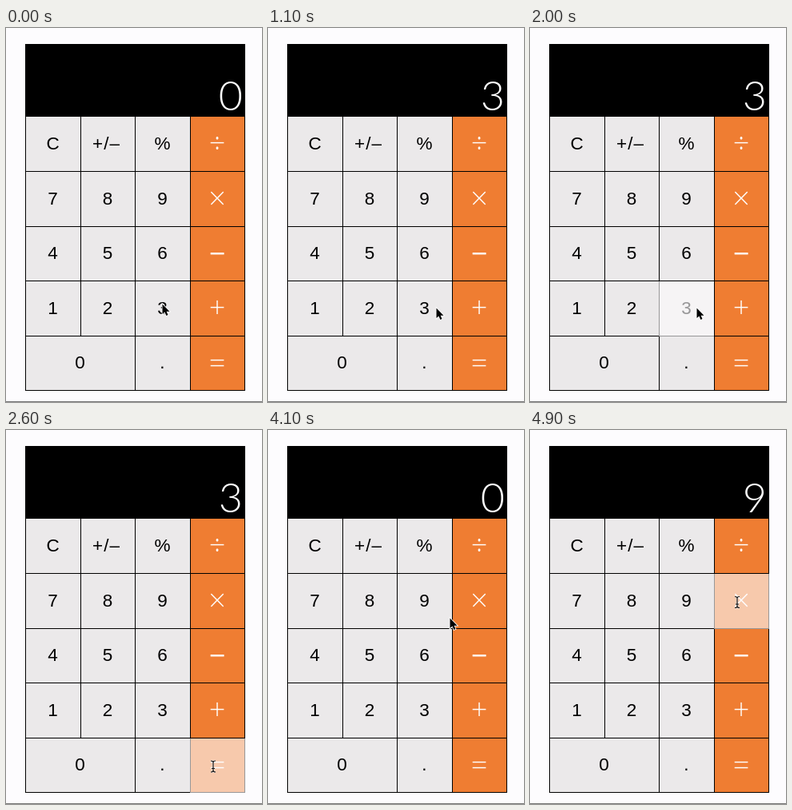
Write an HTML page that moves like this. It is 320 by 468 pixels and loops after 5 s.

```html
<!DOCTYPE html>
<html lang="en">
<head>
<meta charset="utf-8">
<title>Calculator</title>
<style>
  html, body { margin: 0; width: 100%; height: 100%; overflow: hidden; background: #fdfcfe; }
  svg { display: block; width: 320px; height: 468px; }
  text { text-anchor: middle; }
  .key { font: 22.5px "Liberation Sans", Arial, sans-serif; fill: #000; }
  .op { font: 300 36px "Open Sans", sans-serif; fill: #fff; }
  .bold { font-weight: 500; }
  .tight { letter-spacing: 1px; }
  #out { font: 300 52px Lato, sans-serif; fill: #fff; text-anchor: end; }
</style>
</head>
<body>
<svg viewBox="0 0 320 468">
  <defs>
    <path id="ibeam" d="M-3 -7Q0 -7 0 -5Q0 -7 3 -7M0 -5V5M-3 7Q0 7 0 5Q0 7 3 7M-2 2.5H2"/>
  </defs>
  <rect y="467" width="320" height="1" fill="#777"/>
  <rect x="24" y="20" width="275" height="434"/>
  <text id="out" x="296" y="103">0</text>
  <g id="keys"></g>
  <rect id="press" fill="#fdfcfe" opacity="0.6"/>
  <path id="arrow" d="M0 0V12.6L2.9 10L4.9 14.4L7 13.5L5.1 9.2H9Z"
        stroke="#fff" stroke-width="1.6" paint-order="stroke"/>
  <g id="beam" fill="none">
    <use href="#ibeam" stroke="#fff" stroke-width="2.4" opacity="0.6"/>
    <use href="#ibeam" stroke="#111" stroke-width="1.2"/>
  </g>
</svg>
<script>
const LOOP = 5000, STEP = 100, PITCH = 68.6;
const HOLD = 100, SETTLE = 100, LINGER = 250;
const $ = id => document.getElementById(id);
const colX = i => Math.round(23.9 + PITCH * i);
const rowY = i => Math.round(110.4 + PITCH * i);

function setAttrs(el, attrs) {
  for (const k in attrs) el.setAttribute(k, attrs[k]);
  return el;
}

function add(tag, attrs, label = "") {
  const el = document.createElementNS("http://www.w3.org/2000/svg", tag);
  setAttrs(el, attrs).textContent = label;
  $("keys").append(el);
}

const cells = {};

function addKey(label, r, c, span = 1) {
  const x = colX(c), y = rowY(r), op = c === 3;
  const width = colX(c + span) - x, height = rowY(r + 1) - y;
  const cx = x + width / 2, cy = y + height / 2;
  const signKey = label.length > 1;
  cells[label] = { cx, cy, box: { x, y: y + 1, width: width + (op ? 1 : 0), height } };
  add("rect", {
    x: x + 1, y: y + 1, width: width - 1, height: height - 1,
    fill: op ? "#ef7d32" : "#ebe9ea"
  });
  add("text", {
    class: (op ? "op" : "key") + (label === "−" ? " bold" : signKey ? " tight" : ""),
    x: cx - (signKey ? 1.5 : 0),
    y: cy + (op ? 12.5 : 7)
  }, label);
}

["C ± % ÷", "7 8 9 ×", "4 5 6 −", "1 2 3 +"].forEach((row, r) =>
  row.replace("±", "+/–").split(" ").forEach((label, c) => addKey(label, r, c)));
addKey("0", 4, 0, 2);
addKey(".", 4, 2);
addKey("=", 4, 3);

// Places the pointer visits; dx, dy are offsets from the key's centre.
const tap = (key, at, dx = -5, dy = 2) => ({ key, dx, dy, arrive: at - SETTLE, leave: at + LINGER, at });
const pass = (key, at, dx, dy) => ({ key, dx, dy, arrive: at, leave: at });
const stops = [
  pass("3", 0, 0, -5),
  tap("3", 1000, 15, 0), tap("+", 1500), tap("3", 2000, 13, 0), tap("=", 2600), tap("C", 3600, -5, 7),
  pass("9", 4100, 32, 22),
  tap("9", 4400), tap("×", 4900)
];

const ease = p => p * p * (3 - 2 * p);
const place = s => [cells[s.key].cx + s.dx, cells[s.key].cy + s.dy];

function pointer(t) {
  const i = stops.findLastIndex(s => s.arrive <= t);
  const from = stops[i], to = stops[i + 1];
  if (t <= from.leave || !to) return { pos: place(from), beam: from.dx < 0 };
  const p = ease((t - from.leave) / (to.arrive - from.leave));
  const [x0, y0] = place(from), [x1, y1] = place(to);
  return { pos: [x0 + (x1 - x0) * p, y0 + (y1 - y0) * p], beam: false };
}

function display(keys) {
  let shown = "0", total = 0, fresh = true;
  for (const key of keys) {
    if (/\d/.test(key)) {
      shown = fresh ? key : shown + key;
      fresh = false;
      continue;
    }
    if (key === "C") shown = "0";
    else if (key === "=") shown = String(total + Number(shown));
    else total = Number(shown);
    fresh = true;
  }
  return shown;
}

function draw(ms) {
  const t = Math.floor(ms % LOOP / STEP) * STEP;
  const { pos, beam } = pointer(t);
  for (const id of ["arrow", "beam"]) {
    $(id).setAttribute("transform", `translate(${pos})`);
    $(id).style.display = (id === "beam") === beam ? "" : "none";
  }
  const held = stops.find(s => t >= s.at && t < s.at + HOLD);
  $("press").style.display = held ? "" : "none";
  if (held) setAttrs($("press"), cells[held.key].box);
  $("out").textContent = display(stops.filter(s => s.at + HOLD <= t).map(s => s.key));
}

const start = performance.now();
function tick() {
  draw(performance.now() - start);
  requestAnimationFrame(tick);
}
tick();
</script>
</body>
</html>
```
